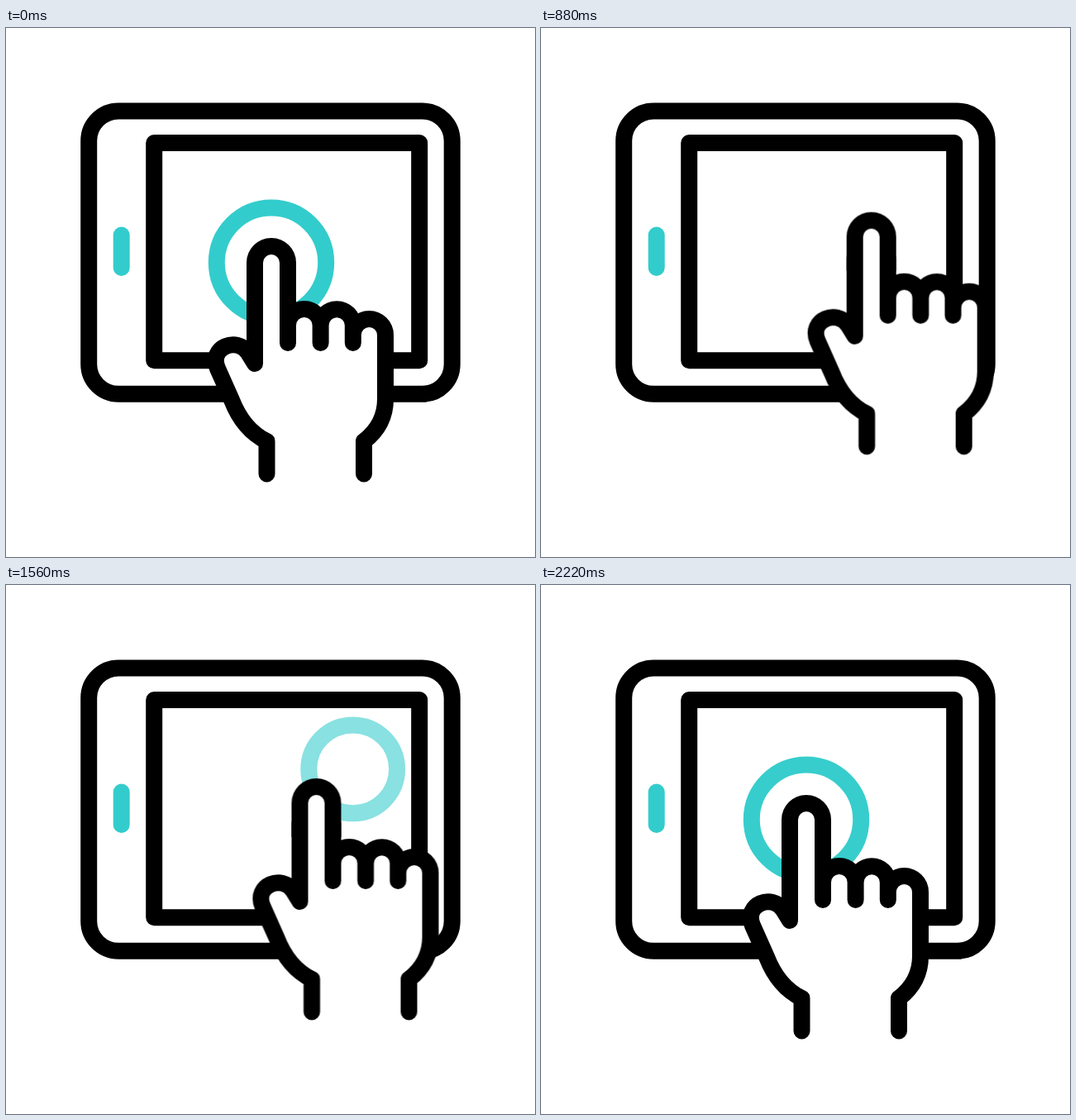
Write an HTML page without scripts that moves like this. It is 640 px wide and 640 px high and loops after 2400 ms.

```html
<!DOCTYPE html>
<html lang="en">
<head>
<meta charset="utf-8">
<title>Tablet drag gesture</title>
<style>
  html, body { margin: 0; width: 100%; height: 100%; overflow: hidden; background: #fff; }
  svg { display: block; width: 100vw; height: 100vh; }

  .line { fill: none; stroke: #000; stroke-width: 20; stroke-linecap: round; stroke-linejoin: round; }
  .accent { stroke: #3cc; }
  .skin { fill: #fff; }
  .tip { fill: #fff; stroke-linecap: butt; }

  .hand, .tip, .ring { animation: 2400ms linear infinite; }
  .hand { animation-name: drag; }
  .tip { animation-name: bend; }
  .start { animation-name: start-ring; }
  .end { animation-name: end-ring; }

  @keyframes drag {
    0%, 25% { transform: none; animation-timing-function: cubic-bezier(.333, 0, .667, 1); }
    41.67%, 57.2% { transform: translate(100px, -42.3px); animation-timing-function: cubic-bezier(.333, 0, .667, 1); }
    73.88%, 100% { transform: none; }
  }
  @keyframes bend {
    0%, 8.33%, 35.3%, 67.4%, 100% { transform: none; animation-timing-function: cubic-bezier(.333, 0, .667, 1); }
    19.6%, 25%, 42.9%, 57.2% { transform: translateY(21.8px); animation-timing-function: cubic-bezier(.333, 0, .667, 1); }
  }
  @keyframes start-ring {
    0%, 8.33% { r: 66.2px; cy: 283.7px; opacity: 1; }
    25%, 75.55% { r: 41.5px; cy: 277.5px; opacity: 0; }
    92.5%, 100% { r: 66.2px; cy: 283.7px; opacity: .98; }
  }
  @keyframes end-ring {
    0%, 41.67% { r: 41.5px; opacity: 0; }
    57.2% { r: 62.3px; opacity: 1; }
    75.55%, 100% { r: 41.5px; opacity: 0; }
  }
</style>
</head>
<body>
<svg viewBox="0 0 640 640">
  <g class="line">
    <rect x="100.2" y="100.5" width="439.5" height="342.3" rx="36"/>
    <rect x="179.2" y="139" width="321" height="263.3"/>
    <path class="accent" d="M139.7 250.5V290"/>
    <circle class="ring start accent" cx="321" cy="283.7" r="66.2"/>
    <circle class="ring end accent" cx="419.7" cy="222.8" r="41.5" opacity="0"/>
  </g>

  <g class="hand">
    <path class="skin" d="M301 312V406L293 393C280 373 248 388 256 412L273 450Q287 486 315.5 500V540H433V500Q459 480 459 449V371.5a19.6 19.6 0 0 0-39.2 0V359.8a19.6 19.6 0 0 0-39.2 0a19.6 19.6 0 0 0-39.6 0V312Z"/>
    <path class="line" d="M301 312V406L293 393C280 373 245 386 256 412L273 450Q287 486 315.5 500V539.5"/>
    <path class="line" d="M433 539.5V500Q459 480 459 449V371.5a19.6 19.6 0 0 0-39.2 0V381V359.8a19.6 19.6 0 0 0-39.2 0V381V359.8a19.6 19.6 0 0 0-39.6 0"/>
    <path class="line" d="M341 312V381"/>
    <path class="line tip" d="M301 325V284a20 20 0 0 1 40 0V325"/>
  </g>
</svg>
</body>
</html>
```
